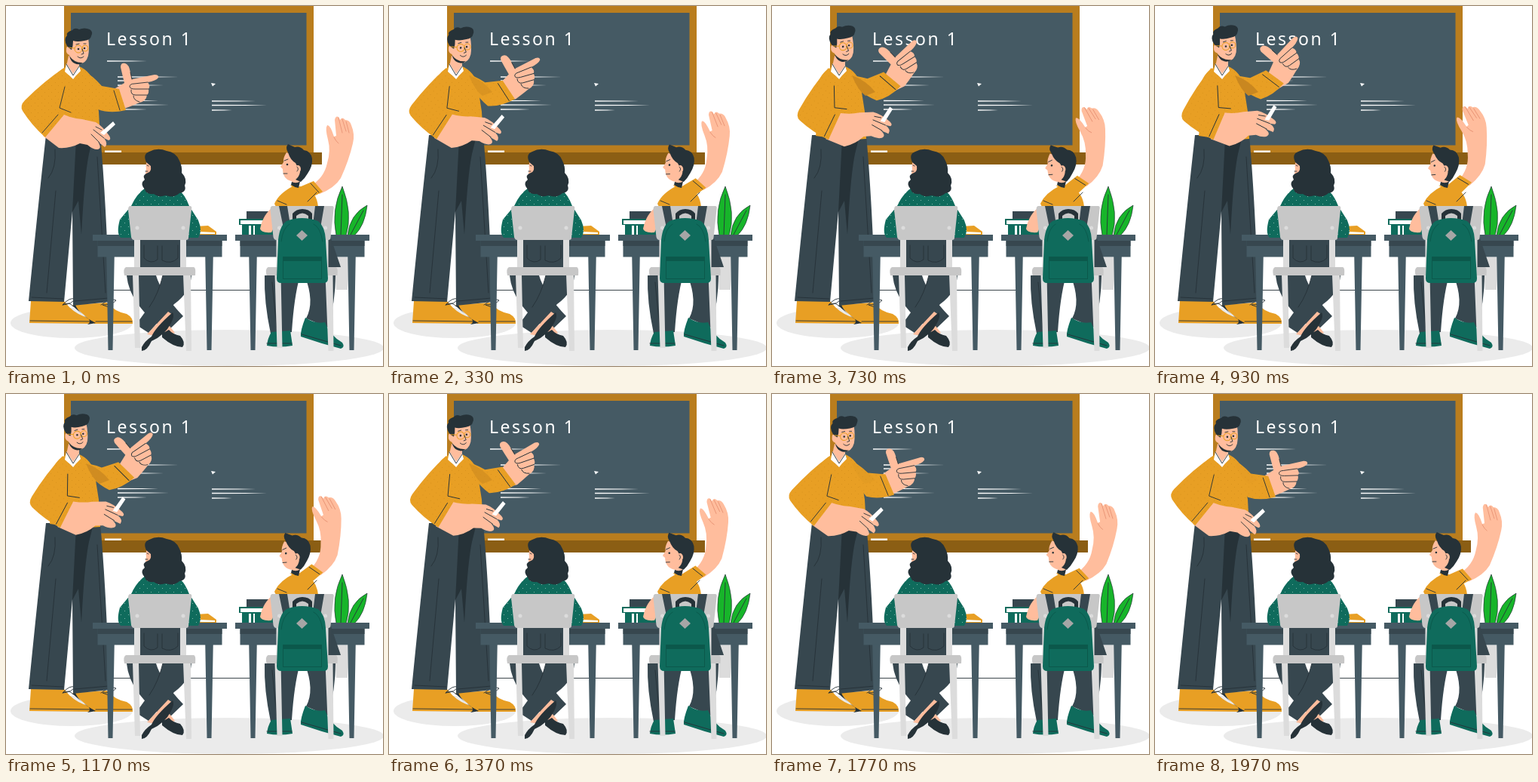
Recreate the animation shown at these times as an HTML page. Size 500 by 477 pixels, loop 2.01 s.

```html
<!DOCTYPE html>
<html lang="en">
<head>
<meta charset="utf-8">
<title>Lesson</title>
<style>
html, body { margin: 0; width: 100%; height: 100%; overflow: hidden; background: #fff; }
svg { display: block; width: 500px; height: 477px; }
.slate { fill: #455a64; } .navy { fill: #37474f; } .ink { fill: #263238; }
.gold { fill: #e89f24; } .skin { fill: #ffbd9d; } .teal { fill: #0f6b5c; }
.seat { fill: #c7c7c7; } .leg { fill: #dcdcdc; } .white { fill: #fff; }
.knit { fill: url(#knit); } .dots { fill: url(#dots); }
.pen { fill: none; stroke: #263238; stroke-width: .9; stroke-linecap: round; stroke-linejoin: round; }
.rim { fill: none; stroke: #e89f24; stroke-width: 1; }
text { font: 500 23px "Noto Sans", "Open Sans", sans-serif; letter-spacing: 2.5px; fill: #fff; }
</style>
</head>
<body>
<svg viewBox="0 0 500 477">
<defs>
  <pattern id="knit" width="9" height="9" patternUnits="userSpaceOnUse">
    <path class="gold" d="M0 0H9V9H0Z"/>
    <path fill="#d8921d" d="M2 2h1v1h-1ZM6 6h1v1h-1Z"/>
  </pattern>
  <pattern id="dots" width="10" height="10" patternUnits="userSpaceOnUse">
    <path class="teal" d="M0 0H10V10H0Z"/>
    <path fill="#7fb5a8" d="M2 2h1v1h-1ZM7 7h1v1h-1Z"/>
  </pattern>
</defs>

<!-- floor and board -->
<ellipse cx="87" cy="420" rx="81" ry="20" fill="#ebebeb"/>
<ellipse cx="296" cy="453" rx="205" ry="24" fill="#ebebeb"/>
<path fill="#b97d1e" d="M77 0H408V195H77Z"/>
<path fill="#8b5e14" d="M86 194H419V210H86Z"/>
<path class="slate" d="M86 9H398.500V184.500H86Z"/>
<path class="white" d="M131 191.500H153V194H131Z"/>
<text x="133" y="52">Lesson 1</text>
<g id="chalk" class="white"></g>
<path class="white" d="M272 102L278 103L274 106.500Z"/>

<!-- teacher: legs and shoes -->
<path class="gold" d="M33 391L77 391L84 399Q94 409 111 414Q116 416 115 421L31 420Z"/>
<path class="gold" d="M88 396L134 393Q144 405 160 408Q169 413 168 421L117 421Z"/>
<path class="ink" d="M88 397L92 396Q97 409 119 420L108 422Q116 417 103 410Z"/>
<path class="pen" d="M32 417L114 418M119 418L167 418M75 396Q84 386 91 388Q88 395 75 396Q84 391 89 398M126 396Q139 386 146 390Q141 396 128 396L139 400"/>
<path class="navy" d="M53 171H125Q133 260 137 392L89 397L88 272L77 392L30 391Q43 260 53 171Z"/>
<path class="ink" d="M93 176H115L110 196Q104 225 100 303L96 258L88 273Z"/>
<path class="pen" d="M34 386L76 388M91 391L136 387M65 190Q67 215 56 228M121 200L132 380M66 245L54 380"/>

<!-- teacher: torso -->
<path class="knit" d="M79 81C62 89 56 108 62 130L58 172Q95 178 125 176L123 140L118 108C116 93 107 84 97 80Z"/>

<g id="point">
  <g id="finger">
    <path class="skin" d="M138 113L157 102Q154 90 152 81Q152 75 158 76Q163 77 165 88L167 97L197 91Q203 91 202 95Q199 99 188 101Q192 106 189 110Q190 115 187 118Q186 126 177 128Q168 132 157 136L138 134Z"/>
    <path class="pen" d="M188 101L170 103Q164 103 164 107Q165 110 171 110L189 110M166 111Q165 118 172 118L187 118M169 119Q169 125 177 127M165 88L167 97"/>
  </g>
  <path class="knit" d="M100 84Q115 92 127 106L150 110L159 138Q138 143 122 137Q114 126 108 108Z"/>
  <path class="pen" d="M143 112L151 138"/>
</g>
<path id="fold" fill="#c98720" d="M106 92Q124 98 137 114L124 119Q114 112 106 92Z"/>

<g id="hold">
  <path class="skin" d="M66 139Q85 149 101 150L119 154Q128 159 137 172Q140 177 136 178L130 175Q136 183 131 187L122 180Q128 189 121 190Q115 190 108 184L98 182Q85 189 70 188L49 172Z"/>
  <path class="white" d="M125 168L142 153L145 157L130 171Z"/>
  <path class="pen" d="M116 164L130 175M113 170L124 181M119 160L127 164"/>
  <path class="knit" d="M77 82Q51 99 25 125Q18 132 22 139Q34 158 52 174L77 144L71 137Q84 113 77 82Z"/>
  <path class="pen" d="M78 107L71 135L86 141M69 144L48 168"/>
</g>

<path class="skin" d="M83 66L97 70L97 83L89 95L80 80Z"/>
<path class="white" d="M80 76L89 90L97 79L99 86L93 92L89 97L85 93L78 87Z"/>
<path class="pen" d="M80 77L89 92L97 80"/>
<g id="head">
  <path class="skin" d="M84 45L109 42Q111 56 109 66Q106 77 96 77Q87 76 84 65Q79 63 80 57Q80 53 84 54Z"/>
  <path class="ink" d="M84 56L81 53Q76 44 81 39Q79 35 88 32Q91 28 97 31Q104 28 111 31Q116 34 113 40Q112 45 104 46Q94 48 89 46Q89 53 87 58Z"/>
  <path class="ink" d="M84 66Q91 76 102 75Q97 79 91 76Q86 74 84 66Z"/>
  <circle class="rim" cx="96" cy="57" r="5"/><circle class="rim" cx="105" cy="56" r="4"/>
  <path class="rim" d="M91 56L83 55"/>
  <circle class="ink" cx="96" cy="57" r="1.300"/><circle class="ink" cx="104" cy="56" r="1.300"/>
  <path class="pen" d="M93 51L97 50M103 50L106 50M101 57L103 63L100 64M95 67Q99 71 103 67"/>
</g>

<!-- plant and pot -->
<path class="leg" d="M434 333H456L453 376H438Z"/>
<path fill="#17b52a" stroke="#263238" stroke-width=".7" d="M438 304Q431 270 446 239Q460 275 451 304ZM453 304Q456 276 479 264Q476 291 462 304Z"/>
<path class="pen" d="M444 304L446 250M457 303L474 271"/>

<!-- desks -->
<path class="pen" d="M142 376.500H326"/>
<g id="desk">
  <path class="slate" d="M133 318H144L141.500 456H135.500ZM264 318H275L272.500 456H266.500Z"/>
  <path class="slate" d="M121.500 311H286.500V332.500H121.500ZM115 303H293V311H115Z"/>
  <path class="navy" d="M121.500 311H286.500V318H121.500Z"/>
</g>
<use href="#desk" x="189"/>
<path class="gold" d="M252 292L268 291L279 299V303H252Z"/>
<path class="white" d="M256 299L277 300V302H256Z"/>
<path class="navy" d="M319 272H350V283H319Z"/>
<path class="teal" d="M309 282H356V290H309ZM313 290H356V303H313Z"/>
<path class="white" d="M311 284H350V289H311ZM322 291H325V303H322ZM328 291H330V303H328Z"/>

<!-- girl -->
<path class="skin" d="M189 202Q184 210 186 215L185 222L195 231L207 223Z"/>
<path class="dots" d="M186 240Q173 249 166 265L151 283Q146 301 152 307H255Q261 298 255 284L243 265Q237 249 228 243Z"/>
<path class="ink" d="M186 207Q181 196 190 193Q201 187 213 192Q226 194 230 205Q234 213 233 221Q241 229 237 238Q240 246 230 248Q222 255 212 251Q202 254 196 249Q186 250 184 243Q177 235 184 230Q180 224 188 221Q193 220 192 212Z"/>
<path class="pen" d="M187 211L189 212M185 219L188 219"/>
<path class="navy" d="M178 310H232L238 346H173Z"/>
<path class="navy" d="M160 357H199Q206 381 235 411L214 431Q164 398 160 357Z"/>
<path class="navy" d="M208 357H246Q244 380 223 395L189 433L172 422Q202 385 208 357Z"/>
<path class="skin" d="M187 435L215 405L221 409L198 437ZM209 427L217 424L224 433L213 438Z"/>
<path class="ink" d="M180 452Q184 444 193 438Q198 426 221 406Q224 410 219 420Q211 436 193 444Q187 457 180 457ZM207 434L216 429Q221 435 231 437Q239 446 234 452Q222 452 207 439Z"/>
<path class="pen" d="M183 317V334Q192 343 201 336V318M207 318V337Q219 343 228 334V317M208 357Q202 382 190 399"/>

<!-- girl's chair -->
<g id="chair">
  <path class="leg" d="M170 309H178V347H170ZM231 309H239V347H231ZM168 356H176L178 453H171ZM235 356H245L246 457H239Z"/>
  <path class="seat" d="M165 265H244Q247 265 246 270L242 307Q242 310 239 310H170Q167 310 166 306L162 270Q162 265 165 265ZM159 346H249Q252 346 251 357H157Q155 348 159 346Z"/>
  <circle class="leg" cx="174" cy="294" r="2.500"/><circle class="leg" cx="235" cy="294" r="2.500"/>
</g>

<!-- boy -->
<path class="skin" d="M356 265Q341 275 337 295Q338 301 352 300L365 274Z"/>
<path class="navy" d="M343 357H390Q382 385 379 432L351 434Q342 392 343 357ZM419 305H430L444 346H414Z"/>
<path class="navy" d="M396 357H437Q437 392 427 426L398 414Q410 392 396 357Z"/>
<path class="teal" d="M352 432L377 430L380 450Q362 453 346 450Q347 440 352 432ZM397 413Q411 422 423 419Q429 436 446 446Q450 452 444 454Q417 447 391 438Q390 431 397 413Z"/>
<path class="pen" d="M346 447L379 447M392 435L444 450M353 366L359 426"/>
<g id="raise">
  <path class="skin" d="M403 239Q422 228 426 208Q431 192 427 177Q423 162 426 158Q430 157 435 173L438 172L436 151Q437 145 441 147L443 151Q446 146 450 151Q456 151 458 158Q463 170 460 182Q455 204 444 228Q436 241 416 249Z"/>
  <path class="pen" style="stroke:#e89475" d="M441 148L446 168M446 150L451 166M451 153L455 168M435 174Q438 180 441 182"/>
  <path class="gold" d="M377 237L389 240L408 232L420 246L395 259Z"/>
  <path class="pen" d="M404 235L415 247"/>
</g>
<path class="gold" d="M356 262Q362 248 382 238L396 240Q412 246 414 266H358Z"/>
<path class="pen" d="M360 258L372 263M400 259L412 247"/>
<path class="skin" d="M378 225L391 223L389 238L380 238Z"/>
<path class="ink" d="M379 233Q386 236 390 232L388 241Q382 240 378 237Z"/>
<g id="boyHead">
  <path class="skin" d="M372 194Q367 202 368 207L364 213L367 216Q367 229 378 232Q388 234 395 222L394 203Z"/>
  <path class="ink" d="M374 194Q370 188 374 183Q378 185 383 187Q390 185 395 191Q404 192 406 202Q407 212 400 222Q396 229 391 233L384 230Q389 226 390 220L384 208Q377 204 374 194Z"/>
  <ellipse class="skin" cx="387" cy="216" rx="4" ry="5"/>
  <circle class="ink" cx="373" cy="210" r="1.300"/>
  <path class="pen" d="M369 205L374 203M368 222L373 222M386 213Q389 216 386 219"/>
</g>

<!-- boy's chair and backpack -->
<use href="#chair" x="188.500"/>
<path class="navy" d="M362 265H373L377 290L368 294ZM410 265H422L417 294L407 290Z"/>
<path class="ink" d="M380 285V275Q385 269 393 269Q402 269 406 275V285H401V278Q393 271 385 278V285Z"/>
<path class="teal" d="M372 285Q392 277 414 285Q423 292 424 310L427 361Q427 367 421 367H365Q359 367 359 361L361 310Q363 291 372 285Z"/>
<path fill="#0b584b" d="M367 332H419V362H367Z"/>
<path class="teal" d="M368 338H418V361H368Z"/>
<path class="pen" style="stroke:#0b584b" d="M365 312Q367 294 376 289M420 312Q417 293 408 289"/>
<path fill="#a6a6a6" d="M392.500 297L400 304L392.500 311L385 304Z"/>
</svg>
<script>
const LOOP = 2010, STEPS = 60;
const $ = id => document.getElementById(id);

// chalk strokes, thin towards the right: x, y, length
const strokes = [
  [134, 73, 53], [148, 94, 81], [148, 99, 36], [148, 105, 61],
  [148, 125.5, 54], [148, 131, 68], [148, 137, 39],
  [273, 126, 58], [273, 131.5, 73], [273, 138, 27]
];
$('chalk').innerHTML = strokes.map(([x, y, w]) =>
  `<path d="M${x} ${y - .7}L${x + w * .6} ${y - .5}L${x + w} ${y}L${x + w * .6} ${y + .6}L${x} ${y + .7}Z"/>`).join('');

// sway amount over the steps of one loop
const keys = [[0, 0], [10, .5], [16, .76], [25, 1.02], [28, 1], [35, .76], [47, .26], [59, .03], [60, 0]];
function slope(i) {
  const a = keys[Math.max(i - 1, 0)], b = keys[Math.min(i + 1, keys.length - 1)];
  return (b[1] - a[1]) / (b[0] - a[0]);
}
function sway(n) {
  const i = keys.findIndex((k, j) => n < keys[j + 1][0]);
  const [x0, y0] = keys[i], [x1, y1] = keys[i + 1];
  const w = x1 - x0, u = (n - x0) / w, v = 1 - u;
  return v * v * (1 + 2 * u) * y0 + u * u * (3 - 2 * u) * y1
    + w * u * v * (v * slope(i) - u * slope(i + 1));
}

// id, full angle, pivot x, pivot y, shift x, shift y
const joints = [
  ['point', -35, 110, 102, 0, 0],
  ['finger', 0, 0, 0, 7, 5],
  ['hold', -16.5, 76, 90, 0, 0],
  ['head', -5, 90, 80, 0, -3],
  ['raise', -16.5, 379, 240, 0, 0],
  ['boyHead', -5, 388, 236, 0, 0]
].map(([id, ...rest]) => [$(id), ...rest]);

function draw(now) {
  const p = sway(Math.floor(now % LOOP / LOOP * STEPS));
  for (const [el, angle, x, y, dx, dy] of joints)
    el.setAttribute('transform', `translate(${dx * p} ${dy * p}) rotate(${angle * p} ${x} ${y})`);
  $('fold').style.opacity = p;
}
const start = performance.now();
function tick() {
  draw(performance.now() - start);
  requestAnimationFrame(tick);
}
tick();
</script>
</body>
</html>
```
